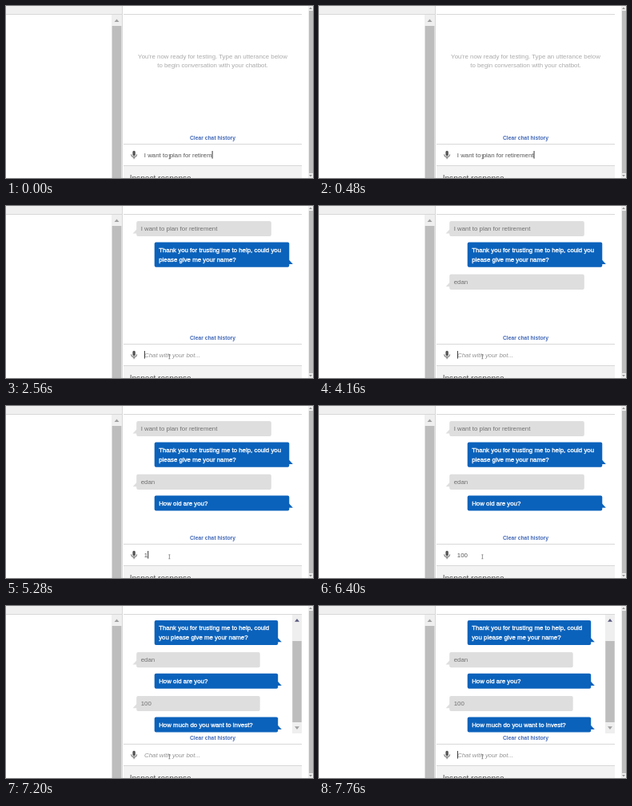
These frames come from a looping animation (384x216 px, 8 s). An HTML page:

```html
<!DOCTYPE html>
<html lang="en">
<head>
<meta charset="utf-8">
<title>Chatbot test</title>
<style>
html, body { margin: 0; width: 100%; height: 100%; overflow: hidden; background: #fff; }
svg { display: block; width: 384px; height: 216px; }
text { font: 7.875px "Liberation Sans", Arial, sans-serif; white-space: pre; }
.hint { fill: #aaa; text-anchor: middle; }
.link { font-size: 6.75px; font-weight: bold; fill: #4068b8; text-anchor: middle; }
.heading { font-size: 10.125px; fill: #555; }
.placeholder { font-style: italic; fill: #929292; }
.typed { fill: #555; }
.user rect, .user path { fill: #dedede; }
.user text { fill: #707070; }
.bot rect, .bot path { fill: #0b62bb; }
.bot text { fill: #fff; stroke: #fff; stroke-width: .3px; }
.thumb { fill: #bdbdbd; }
.track { fill: #efefef; }
.line { fill: #d8d8d8; }
</style>
</head>
<body>
<svg viewBox="0 0 384 216">
  <defs><clipPath id="view"><rect x="147" y="11" width="223" height="148.6"/></clipPath></defs>
  <rect width="384" height="216" fill="#fff"/>

  <rect width="145" height="10" fill="#f0f0f0"/>
  <rect class="line" y="10" width="145" height="1"/>
  <rect class="track" x="132" y="11" width="13" height="14"/>
  <path d="M135.5 20h6l-3-3.6z" fill="#a0a0a0"/>
  <rect class="thumb" x="132.5" y="25" width="12" height="191"/>
  <rect class="line" x="145" width="1" height="216"/>

  <rect class="line" x="147" y="10" width="223" height="1"/>
  <rect class="track" x="378" width="6" height="216"/>
  <path d="M379 4h4l-2-2.5zM379 212h4l-2 2.5z" fill="#999"/>
  <rect class="thumb" x="379" y="6" width="5" height="204"/>

  <g id="hint">
    <text class="hint" x="258.5" y="65.5">You're now ready for testing. Type an utterance below</text>
    <text class="hint" x="258.5" y="77.3">to begin conversation with your chatbot.</text>
  </g>

  <g clip-path="url(#view)"><g id="log"></g></g>

  <g id="bar">
    <rect class="track" x="358" y="11" width="12" height="149"/>
    <path d="M361 19.7h6l-3-3.6z" fill="#5c5c80"/>
    <path d="M361 151.3h6l-3 3.6z" fill="#a0a0a0"/>
    <rect class="thumb" id="thumb" x="358.3" width="11.4"/>
  </g>

  <text class="link" x="258.5" y="168.3">Clear chat history</text>
  <rect class="line" x="147" y="173" width="223" height="1"/>
  <rect x="147" y="201" width="223" height="15" fill="#f3f3f3"/>
  <rect class="line" x="147" y="200" width="223" height="1"/>
  <text class="heading" x="154.7" y="219.8">Inspect response</text>

  <g fill="none" stroke="#555">
    <rect x="158.4" y="181.8" width="3.4" height="6.6" rx="1.7" fill="#555" stroke="none"/>
    <path d="M156.6 186.4a3.5 3.5 0 0 0 7 0M160.1 189.8v2.4" stroke-width=".9"/>
  </g>

  <text class="placeholder" id="placeholder" x="173" y="189.5">Chat with your bot...</text>
  <text class="typed" id="typed" x="172.8" y="189.5"></text>
  <rect id="caret" y="182" width=".9" height="9.6" fill="#222"/>
  <path d="M203.4 186.8h2M204.4 186.8v5M203.4 191.8h2" fill="none" stroke="#555" stroke-width=".6"/>
</svg>
<script>
const LOOP = 8000, TOP = 19, LINE = 12, VIEW = 149, TRACK = 121;
const GAP = { user: 7.5, bot: 9.1 };
const WRAP_AT = 6640, SCROLL_AT = 7200;
const first = "I want to plan for retirement";

const messages = [
  { at: 560, who: "user", wide: [first] },
  { at: 960, who: "bot",
    wide: ["Thank you for trusting me to help, could you", "please give me your name?"],
    narrow: ["Thank you for trusting me to help, could", "you please give me your name?"] },
  { at: 4160, who: "user", wide: ["edan"] },
  { at: 4640, who: "bot", wide: ["How old are you?"] },
  { at: WRAP_AT, who: "user", wide: ["100"] },
  { at: SCROLL_AT, who: "bot", wide: ["How much do you want to invest?"] }
];

// [time, input text]
const typing = [
  [0, first.slice(0, -3)], [80, first.slice(0, -2)], [240, first.slice(0, -1)], [480, first], [560, ""],
  [3440, "e"], [3520, "ed"], [3600, "eda"], [4000, "edan"], [4160, ""],
  [5280, "1"], [5360, "10"], [5600, "100"], [6640, ""]
];

// [time, caret visible]
const blink = [
  [0, 1], [1040, 0], [1520, 1], [2000, 0], [2560, 1], [3040, 0], [3440, 1],
  [4480, 0], [5040, 1], [6240, 0], [6640, 1], [7200, 0], [7760, 1]
];

const el = id => document.getElementById(id);
const show = (id, on) => el(id).setAttribute("visibility", on ? "visible" : "hidden");
const valueAt = (steps, t) => steps.filter(s => s[0] <= t).pop()[1];

function bubble({ who, wide, narrow }, y, slim) {
  const lines = slim && narrow || wide;
  const bot = who === "bot";
  const x = bot ? 185.7 : 163.2;
  const w = slim ? 154.5 : 168.6;
  const h = 7.1 + LINE * lines.length;
  const edge = bot ? x + w - 1 : x + 1;
  const tip = bot ? 5.6 : -5.6;
  const text = lines.map((s, i) =>
    `<text x="${x + 5.5}" y="${y + 12.4 + i * LINE}">${s}</text>`).join("");
  return { h, svg: `<g class="${who}"><rect x="${x}" y="${y}" width="${w}" height="${h}" rx="2"/>
    <path d="M${edge} ${y + h - 9.7}v6h${tip}z"/>${text}</g>` };
}

function drawLog(t) {
  const slim = t >= WRAP_AT;
  const scroll = t >= SCROLL_AT ? 27.7 : 0;
  let y = TOP, svg = "";
  for (const m of messages.filter(m => m.at <= t)) {
    const b = bubble(m, y, slim);
    svg += b.svg;
    y += b.h + GAP[m.who];
  }
  el("log").innerHTML = svg;
  el("log").setAttribute("transform", `translate(0 ${-scroll})`);
  const scale = TRACK / (VIEW + scroll);
  el("thumb").setAttribute("y", 25 + scroll * scale);
  el("thumb").setAttribute("height", VIEW * scale);
  show("bar", slim);
  show("hint", t < messages[0].at);
}

let shown = -1;
function draw(t) {
  const count = messages.filter(m => m.at <= t).length;
  if (count !== shown) {
    drawLog(t);
    shown = count;
  }
  const value = valueAt(typing, t);
  const typed = el("typed");
  if (typed.textContent !== value) typed.textContent = value;
  show("placeholder", !value);
  el("caret").setAttribute("x", 172.9 + (value ? typed.getComputedTextLength() : 0));
  show("caret", valueAt(blink, t));
}

const start = performance.now();
function tick() {
  draw((performance.now() - start) % LOOP);
  requestAnimationFrame(tick);
}
tick();
</script>
</body>
</html>
```
